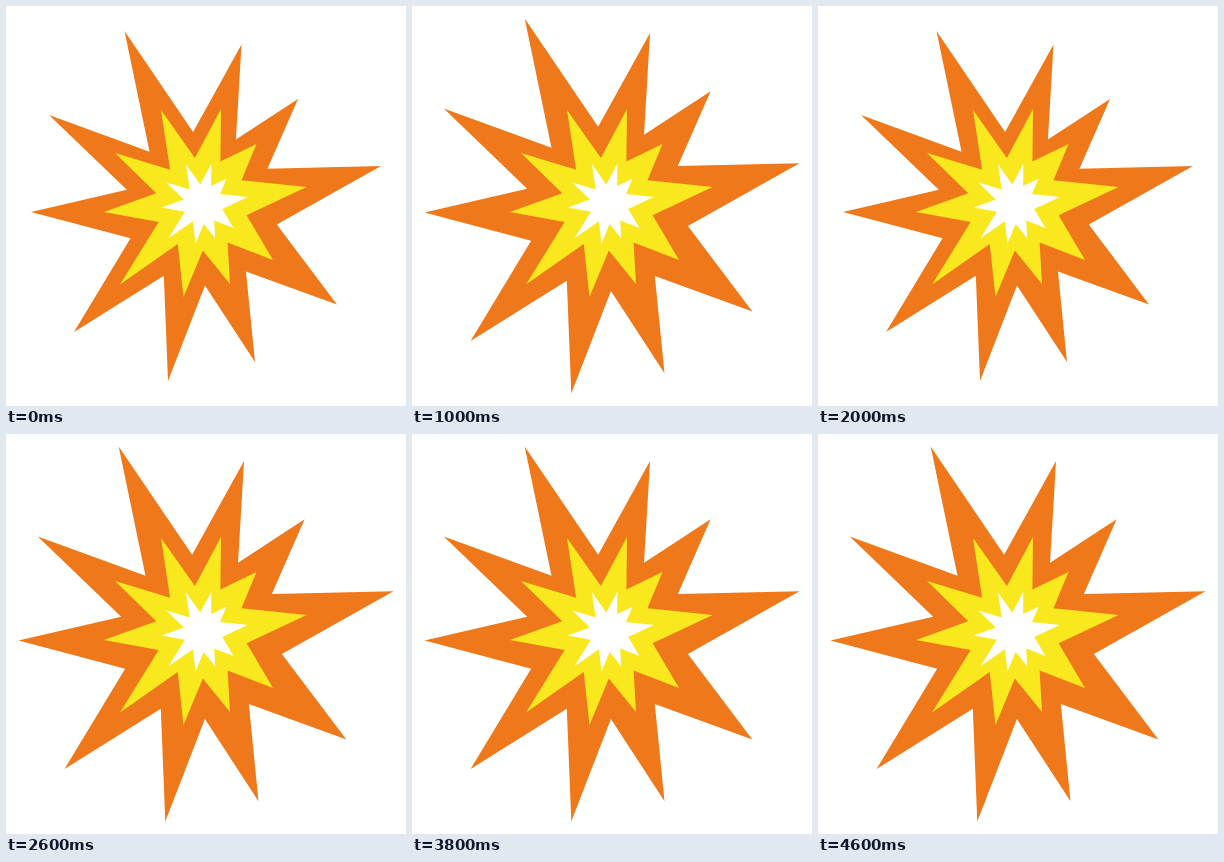
These frames come from a looping animation (400x400 px, 4.8 s). An HTML page with a canvas:

```html
<!DOCTYPE html>
<html>
<head>
<meta charset="utf-8">
<style>
html, body { margin: 0; width: 100%; height: 100%; overflow: hidden; background: #fff; }
canvas { display: block; width: 400px; height: 400px; }
</style>
</head>
<body>
<canvas id="stage" width="400" height="400"></canvas>
<script>
const ctx = document.getElementById("stage").getContext("2d");
const STEP = 200;
const GROWTH = 1.0715;
const TAU = Math.PI * 2;

// Spike tips relative to the centre, clockwise; the notches lie on a circle
const flame = {
  tips: [[-81.5, -175], [35.5, -161.5], [92, -107], [175, -40], [131, 98.5],
    [49, 156], [-38, 175], [-132, 126], [-175, 6], [-157, -91]],
  notch: { x: -4.5, y: 2.5, r: 77 }
};
const glow = {
  tips: [[-45, -96], [15, -97], [50.5, -62], [100.5, -19], [67, 54],
    [24, 78], [-22.5, 91], [-86, 78.5], [-102, 6], [-91, -53]],
  notch: { x: -4.5, y: -2, r: 46.5 }
};

function star({ tips, notch }, color, cx, cy, scale) {
  const plot = (x, y) => ctx.lineTo(cx + x * scale, cy + y * scale);
  ctx.beginPath();
  tips.forEach(([x, y], i) => {
    const [nx, ny] = tips[(i + 1) % tips.length];
    const from = Math.atan2(y, x);
    const gap = (Math.atan2(ny, nx) - from + TAU) % TAU;
    const mid = from + gap / 2;
    plot(x, y);
    plot(notch.x + notch.r * Math.cos(mid), notch.y + notch.r * Math.sin(mid));
  });
  ctx.closePath();
  ctx.fillStyle = color;
  ctx.fill();
}

function draw(t) {
  const big = Math.floor(t / STEP) % 2 === 1;
  ctx.fillStyle = "#fff";
  ctx.fillRect(0, 0, 400, 400);
  star(flame, "#ef781a", 200, 200, big ? GROWTH : 1);
  star(glow, "#f9e81e", 200, 200, 1);
  star(glow, "#fff", 199, 199, 0.425);
}

const start = performance.now();
function tick() {
  draw(performance.now() - start);
  requestAnimationFrame(tick);
}
tick();
</script>
</body>
</html>
```
